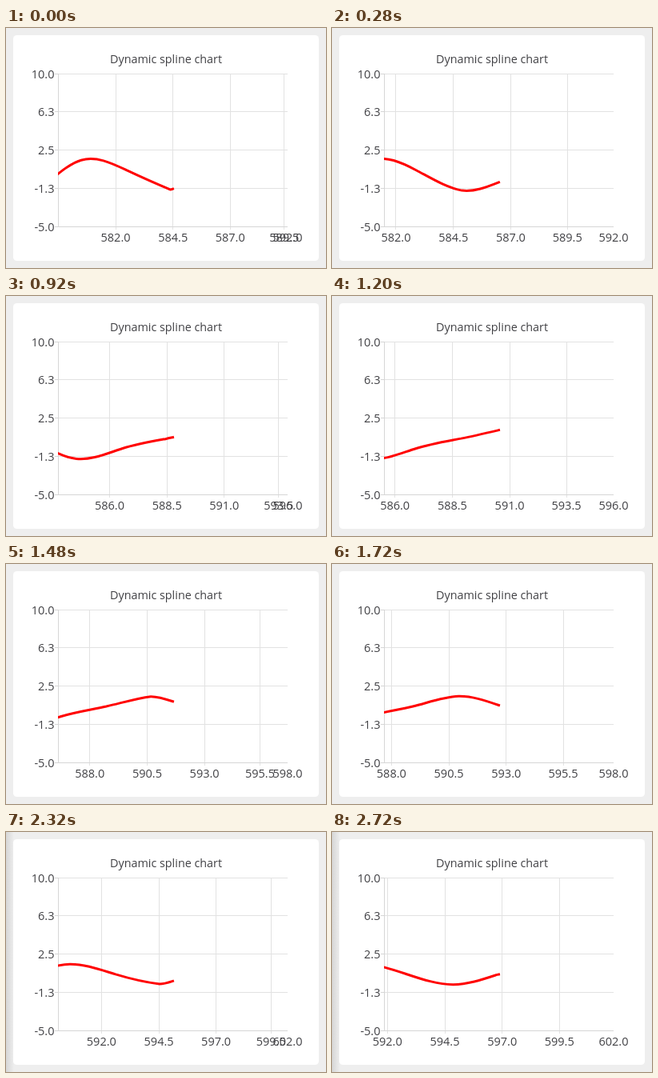
An HTML page that plays this animation: 400 by 300 pixels, repeating every 2820 ms.

```html
<!DOCTYPE html>
<html lang="en">
<head>
<meta charset="utf-8">
<title>Dynamic spline chart</title>
<style>
  html, body { margin: 0; width: 100%; height: 100%; overflow: hidden; background: #eee; }
  svg { display: block; width: 400px; height: 300px; }
  text { font: 14.5px "Open Sans", "Noto Sans", sans-serif; fill: #404044; }
  .title { font-size: 14.35px; }
  .mid { text-anchor: middle; }
  .end { text-anchor: end; }
  .grid { stroke: #e2e2e2; }
  .axis { stroke: #d6d6d6; }
  #curve { fill: none; stroke: #f00; stroke-width: 3; stroke-linecap: square; stroke-linejoin: bevel; }
</style>
</head>
<body>
<svg viewBox="0 0 400 300">
  <defs>
    <linearGradient id="fade">
      <stop offset="0" stop-color="#d6d6d6"/>
      <stop offset="1" stop-color="#eee"/>
    </linearGradient>
    <clipPath id="plot"><rect x="65" y="57" width="287" height="191"/></clipPath>
  </defs>
  <rect width="400" height="300" fill="#eee"/>
  <rect id="shade" width="10" height="300" fill="url(#fade)"/>
  <rect x="9" y="9" width="382" height="282" rx="4.5" fill="#fff"/>
  <text class="title mid" x="200" y="44">Dynamic spline chart</text>
  <g id="rows"></g>
  <g id="cols"></g>
  <path class="axis" d="M65.5 57V248M65 248.5H352"/>
  <g clip-path="url(#plot)"><path id="curve"/></g>
</svg>
<script>
const LEFT = 65, RIGHT = 352, TOP = 57, BOTTOM = 248;
const TICK = (RIGHT - LEFT) / 4, SHIFT = (RIGHT - LEFT) / 5, HEAD = (LEFT + RIGHT) / 2;
const LOOP = 2820, FRAME = 40, LAST = 2720, STEP = 500;

// Random walk values; the entry at FIRST arrives as the loop begins.
const values = [.5, -.5, -1.5, -2.5, -1.5, 1.5, .5, -1.5, -.5, .5, 1.5, .5, -.5, .5, 1.5];
const FIRST = 8;
const clock = [[0, 15], [280, 335], [600, 690], [1200, 1350], [1720, 1909], [2320, 2582], [2720, 3014]];

const $ = id => document.getElementById(id);
const ease = ms => 1 - (1 - Math.min(ms / 1000, 1)) ** 4;
const mix = (a, b, k) => a.map((p, i) => [p[0] + (b[i][0] - p[0]) * k, p[1] + (b[i][1] - p[1]) * k]);
const yOf = v => BOTTOM - (v + 5) / 15 * (BOTTOM - TOP);

function add(parent, tag, attrs, text = '') {
  const el = document.createElementNS('http://www.w3.org/2000/svg', tag);
  for (const key in attrs) el.setAttribute(key, attrs[key]);
  el.textContent = text;
  return parent.appendChild(el);
}

// First Bezier controls of a natural spline, for one coordinate.
function firstControls(p) {
  const n = p.length - 1;
  if (n === 1) return [(2 * p[0] + p[1]) / 3];
  const rhs = p.slice(0, n).map((v, i) =>
    i === 0 ? v + 2 * p[1] : i === n - 1 ? (8 * v + p[n]) / 2 : 4 * v + 2 * p[i + 1]);
  const out = [rhs[0] / 2], carry = [];
  let b = 2;
  for (let i = 1; i < n; i++) {
    carry[i] = 1 / b;
    b = (i < n - 1 ? 4 : 3.5) - carry[i];
    out[i] = (rhs[i] - out[i - 1]) / b;
  }
  for (let i = n - 1; i > 0; i--) out[i - 1] -= carry[i] * out[i];
  return out;
}

// Flat list: point, control, control, point, ...
function spline(pts) {
  const n = pts.length - 1;
  const c = [0, 1].map(d => firstControls(pts.map(p => p[d])));
  const nodes = [pts[0]];
  for (let i = 0; i < n; i++) {
    const next = pts[i + 1];
    nodes.push(
      [c[0][i], c[1][i]],
      [0, 1].map(d => i < n - 1 ? 2 * next[d] - c[d][i + 1] : (next[d] + c[d][i]) / 2),
      next);
  }
  return nodes;
}

// Each step starts where the interrupted one before it stopped.
const steps = [];
let pose = [[HEAD, yOf(values[0])]];
for (let k = 1; k < values.length; k++) {
  const tip = pose[pose.length - 1];
  const from = [...pose, tip, tip, tip];
  const to = spline(values.slice(0, k + 1).map((v, j) => [HEAD - SHIFT * (k - j), yOf(v)]));
  steps[k] = { from, to };
  pose = mix(from, to, ease(STEP));
}

['10.0', '6.3', '2.5', '-1.3', '-5.0'].forEach((label, i) => {
  const y = Math.floor(TOP + i * (BOTTOM - TOP) / 4);
  if (i < 4) add($('rows'), 'path', { class: 'grid', d: `M65 ${y + .5}H352` });
  add($('rows'), 'path', { class: 'axis', d: `M61 ${y + .5}H65` });
  add($('rows'), 'text', { class: 'end', x: 60.5, y: y + 6 }, label);
});

// Tick offsets at the start of a step, right to left.
const rest = 1 - ease(STEP);
const offsets = [0, TICK];
while (offsets.length < 5) offsets.push(TICK + rest * offsets[offsets.length - 1]);
offsets.reverse();

const cols = offsets.map((offset, i) => ({
  offset,
  line: i < 4 && add($('cols'), 'path', { class: 'grid', d: 'M.5 57V252' }),
  label: add($('cols'), 'text', { class: 'mid', y: 267 })
}));

function chartTime(t) {
  let i = 1;
  while (i < clock.length - 1 && t > clock[i][0]) i++;
  const [a, b] = [clock[i - 1], clock[i]];
  return a[1] + (b[1] - a[1]) * (t - a[0]) / (b[0] - a[0]);
}

function draw(t) {
  const ms = chartTime(t);

  const turn = Math.min(5, Math.floor(ms / STEP));
  const left = 1 - ease(ms - turn * STEP);
  cols.forEach(({ offset, line, label }, i) => {
    const x = LEFT + i * TICK + offset * left;
    if (line) line.setAttribute('transform', `translate(${Math.floor(x)} 0)`);
    label.setAttribute('x', x.toFixed(2));
    label.textContent = (582 + 2 * turn + 2.5 * i).toFixed(1);
  });

  const k = Math.floor(ms / STEP);
  const { from, to } = steps[FIRST + k];
  const nodes = mix(from, to, ease(ms - k * STEP)).map(p => p.map(v => v.toFixed(2)).join(' '));
  $('curve').setAttribute('d', `M${nodes[0]}C${nodes.slice(1).join(' ')}`);

  $('shade').style.display = t >= 2280 ? '' : 'none';
}

const begin = performance.now();
function tick() {
  const t = (performance.now() - begin) % LOOP;
  draw(Math.min(LAST, Math.floor(t / FRAME) * FRAME));
  requestAnimationFrame(tick);
}
tick();
</script>
</body>
</html>
```
